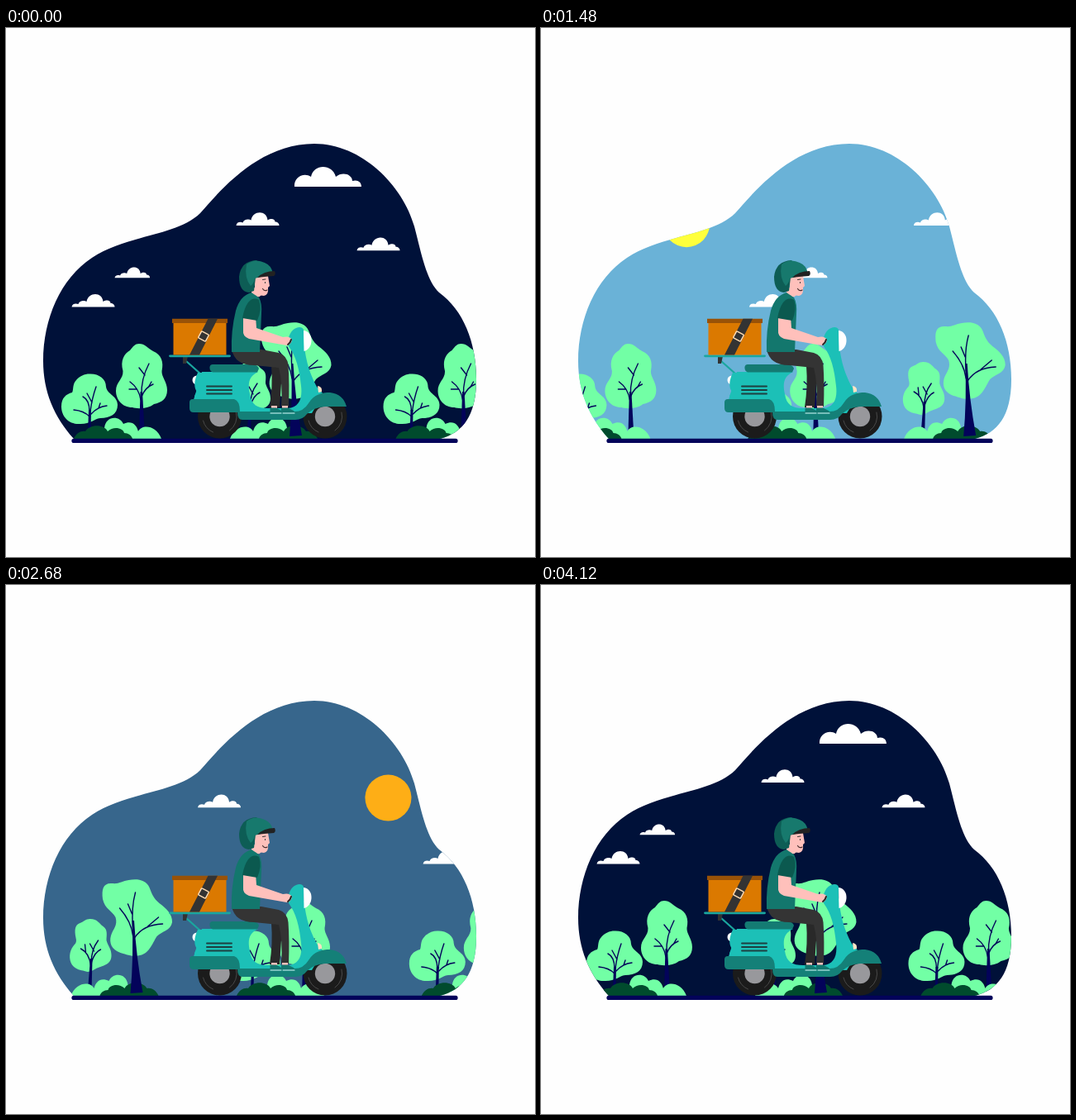
Animation of 640 by 640 pixels, one loop 4160 ms. Source, as an HTML page:

```html
<!DOCTYPE html>
<html lang="en">
<head>
<meta charset="utf-8">
<title>Scooter delivery</title>
<style>
html, body { margin: 0; width: 100%; height: 100%; overflow: hidden; background: #fefefe; }
svg { display: block; width: 100%; height: 100%; }
.leaf { fill: #72ffa5; }
.dark { fill: #004b2d; }
.trunk { fill: #03035a; }
.wood { fill: none; stroke: #03035a; stroke-width: 1.4; stroke-linecap: round; stroke-linejoin: round; }
.line { fill: none; stroke-linecap: round; stroke-linejoin: round; }
</style>
</head>
<body>
<svg viewBox="0 0 640 640">
  <defs>
    <clipPath id="blob"><path d="M82 497C58 470 45 440 45 403C45 352 66 303 104 278C146 250 206 252 235 224C262 193 308 140 373 140C430 140 480 190 494 240C502 270 508 305 524 320C553 341 569 380 569 425C569 470 552 490 525 497Z"/></clipPath>

    <path id="cloud" fill="#fff" d="M0 0C1-4.500 5-4.500 8-3.500C9-7.500 15-8.500 18-6.500C20-18.500 37-19 38-6.500C43-9.500 47-7.500 47-4.500C50-4.500 52-2.500 52 0Z"/>
    <path id="bigCloud" fill="#fff" d="M0 0C-1-11 11-18 20-12C23-28 46-28 50-12C58-19 70-15 70-7C76-9 81-6 81 0Z"/>

    <g id="bushes">
      <path class="leaf" d="M104 497C107 487 113 484 119 484C121 468 138 469 142 479C152 474 158 480 160 488C164 479 182 480 188 497Z"/>
      <path class="dark" d="M82 497C85 490 91 487 96 488C101 479 119 479 123 488C130 481 142 484 143 490C148 490 152 493 153 497Z"/>
    </g>

    <g id="pair">
      <path class="leaf" d="M101 418.500C112 418 121 424 121 434C122 443 135 445 135 456C135 467 126 472 114 472C106 473 103 479 90 479C76 480 67 470 67 458C67 447 73 443 80 441C82 438 80 431 85 426C89 421 95 418.500 101 418.500Z"/>
      <path class="leaf" d="M161 382C168 382 171 387 178 391C188 395 191 404 188.500 415C188 422 195 428 195 438C195 449 188 453 179 455C172 461 158 461 153 459C140 459 133 449 133 439C133 428 142 425 141.500 415C138 402 143 394 150 390C154 385 156 382 161 382Z"/>
      <path class="wood" d="M101 470Q94 463 82 462M101 464Q101 450 93 446M102 464Q104 448 109 434M104 453L98 442M103 467Q111 458 122 457M112 460L114 454"/>
      <path class="trunk" d="M100 462H103L102.500 492H99Z"/>
      <path class="wood" d="M163 450Q161 436 150 428M158 437L149 437M164 445Q163 425 173 406M168 420L161 411M164 446Q168 435 178 431M172 435L176 428"/>
      <path class="trunk" d="M162.500 440H165L168 494H161Z"/>
      <use href="#bushes"/>
    </g>

    <g id="grove">
      <path class="leaf" d="M294 404C304 404 305 410 310 413C316 417 314 424 314 430C316 437 320 440 320 448C320 459 311 460 304 463C298 465 297 468 291 468C286 466 282 467 276 463C270 459 268 450 271 442C274 434 279 435 277 427C275 417 276 411 282 409C287 407 289 404 294 404Z"/>
      <path class="wood" d="M295 460Q293 445 283 440M289 445L288 435M296 457Q295 442 304 430M299 443L294 434M296 456Q300 444 307 441"/>
      <path class="trunk" d="M294.500 452H297L296 490H291.500Z"/>
      <use href="#bushes" transform="translate(459 0) scale(-1 1)"/>
      <path class="leaf" d="M341 357C350 355 362 356 366 366C369 374 371 379 378 385C386 391 394 398 393.500 408C392 418 381 419 375 425C369 434 366 447 352 448.500C343 450 336 446 331 445C320 441 317 433 319.500 424C322 416 328 412 325 402C321 394 312 392 309.500 380C308 368 310 360 321 361C329 362 333 358 341 357Z"/>
      <path class="wood" d="M346 424Q344 407 330 391M346 415Q344 390 349 372M345 398L340 386M348 427Q358 411 382 410M364 413L377 402"/>
      <path class="trunk" d="M345 406H347.500Q350 450 358 493L343 494Q347 450 345 406Z"/>
    </g>

    <g id="wheel">
      <circle r="26.500" fill="#1b1b1b"/>
      <path class="line" stroke="#555" stroke-width=".8" d="M-20 5A20.500 20.500 0 0 0-8 19M20-5A20.500 20.500 0 0 1 12 17"/>
      <circle r="12.200" fill="#98989c"/>
    </g>
  </defs>

  <g clip-path="url(#blob)">
    <rect id="sky" width="640" height="640"/>
    <circle id="sun" r="28"/>
    <g id="clouds"></g>
    <g id="trees"></g>
  </g>
  <path class="line" stroke="#03035a" stroke-width="5.200" d="M82 499.400H544"/>

  <!-- Scooter -->
  <use href="#wheel" x="258.500" y="470"/>
  <use href="#wheel" x="386" y="470"/>
  <path class="line" stroke="#1aa79f" stroke-width="2.200" d="M218 403L236 419"/>
  <path fill="#333" d="M214 397H220L218 406H214Z"/>
  <circle cx="231" cy="426" r="5.500" fill="#fff"/>
  <path fill="#1cc0b7" d="M237 416H305C294 421 292 430 295 443C297 456 304 460 317 460H341C354 459 359 449 357 433C355 413 351 397 342 385C340 375 344 366 351 363C355 361 359 362 360 365C360 397 367 417 376 434L384 443L370 466H284L227 450Z"/>
  <path fill="#1cc0b7" d="M232 417H250V450H228Q227 445 231 440Q225 432 232 417Z"/>
  <path fill="#148078" d="M226 449H276Q283 451 283 464H349Q360 464 366 454C373 443 382 441 392 441Q408 443 412 458H386Q372 459 364 467Q359 474 350 474H286Q280 474 280 465H227Q222 465 222 460V453Q222 449 226 449Z"/>
  <path fill="#147b73" d="M250 407H299Q305 408 306 412L304 416.500H250Q246 415 246.500 410Q247 407 250 407Z"/>
  <path class="line" stroke="#1d3f40" stroke-width="1.900" d="M243 433.500H273M243 438H273M243 442.500H273"/>
  <path fill="#fff" d="M360 366C367 367 370 373 369.500 379C369 386 365 390 360.500 391Z"/>
  <path fill="#ffe3c4" d="M377 433Q383 434 382 440L378 441Z"/>

  <!-- Parcel -->
  <path class="line" stroke="#1aa79f" stroke-width="2.800" d="M198.500 396.800H270.500"/>
  <path fill="#db7900" d="M202.500 354H266.500V395.500H202.500Z"/>
  <path fill="#995207" d="M201 351.700H268V357H201Z"/>
  <path fill="#333" d="M244.500 351.700H256L234 395.500H222Z"/>
  <rect x="-5" y="-4.500" width="10" height="9" rx="1" transform="translate(239 373) rotate(28)" fill="#333" stroke="#ffdcb4" stroke-width="1.500"/>

  <!-- Rider -->
  <path fill="#292929" d="M306 397L335 401L331 459H319Q323 433 321 409Z"/>
  <path fill="#343434" d="M273 389H309L330 393Q340 396 341.500 408Q343 430 342 458H333Q335 430 330 411L300 408Q277 408 273 389Z"/>
  <path fill="#ffc0bb" d="M321 457H328V461H321ZM334 457H341V461H334Z"/>
  <path fill="#12776f" d="M319.500 459.500H327L335 464V466H319.500ZM333 459.500H341L348 463Q350 465 349 466H333Z"/>
  <path class="line" stroke="#d9ffff" stroke-width="1" d="M320 466H333M335 466H349"/>
  <path fill="#ffc0bb" d="M297 313L309 316V323Q305 328 297 323Z"/>
  <path fill="#13776d" d="M297 320Q303 324 306 326Q310 333 309 346L307 392H273Q272 366 278 342Q283 324 297 320Z"/>
  <path fill="#ffc0bb" d="M287 349H302L303 363L335 374Q343 372 346 377Q345 383 340 384L334 383L294 376Q286 373 287 366Z"/>
  <path fill="#0b594f" d="M293 332Q299 325 306 329Q310 340 304 354L286 351Q288 339 293 332Z"/>
  <path class="line" stroke="#252525" stroke-width="2" d="M345 377Q344 381 341 383"/>
  <path fill="#ffc0bb" d="M301 300H317L319 312L317 314Q318 323 312 324Q304 324 301 317Z"/>
  <path fill="#0d5d55" d="M303 281Q284 282 282 301Q282 319 294 320L300 318L302 302L315 297Z"/>
  <path fill="#17796d" d="M291 286Q301 278 313 284Q321 287 323 297L301 303Q300 309 296 312Q288 302 291 286Z"/>
  <path fill="#222" d="M304 302Q312 294 325 294Q327 298 324 300L312 301Z"/>
  <path class="line" stroke="#333" stroke-width="1" d="M310.500 304.500L314 304M313.500 307.500V308.500"/>
  <path class="line" stroke="#472c2c" stroke-width="1.200" d="M310.500 315.500Q313 319 316 317"/>
</svg>
<script>
const $ = id => document.getElementById(id);
const STEP = 40, LOOP = 104, CYCLE = 51, SPEED = 12.03;

const use = (name, x, y = 0, scale = 1) =>
  `<use href="#${name}" transform="translate(${x} ${y}) scale(${scale})"/>`;
const repeat = (part, width) => part + `<g transform="translate(${width} 0)">${part}</g>`;

$("clouds").innerHTML = repeat(
  use("cloud", 79.5, 337.6) + use("cloud", 131.5, 302.3, .82) + use("cloud", 278.5, 238.9) +
  use("bigCloud", 349, 192) + use("cloud", 424.5, 269.2), 617.5);
$("trees").innerHTML = repeat(use("pair", 0) + use("grove", 0) + use("pair", 389.5), 613.3);

// Colour stops: [step, r, g, b]
const skyStops = [[0, 0, 17, 57], [16, 98, 171, 208], [22, 122, 195, 232], [37, 106, 178, 215],
  [51, 80, 143, 179], [67, 55, 102, 140], [88, 20, 49, 88], [100, 0, 17, 57]];
const sunStops = [[16, 252, 253, 130], [37, 255, 255, 60], [51, 253, 251, 20],
  [67, 254, 174, 22], [88, 255, 127, 20]];

function colour(stops, step) {
  let i = stops.findIndex(s => s[0] >= step);
  if (i < 0) i = stops.length - 1;
  const b = stops[i], a = stops[Math.max(0, i - 1)];
  const k = a === b ? 1 : Math.min(1, (step - a[0]) / (b[0] - a[0]));
  return `rgb(${[1, 2, 3].map(c => Math.round(a[c] + (b[c] - a[c]) * k))})`;
}

function draw() {
  const step = Math.floor(performance.now() / STEP) % LOOP;
  const shift = step ? ((step - 1) % CYCLE + 1) * SPEED : 0;
  for (const id of ["clouds", "trees"]) $(id).setAttribute("transform", `translate(${-shift} 0)`);

  const angle = (-8 + 1.963 * step) * Math.PI / 180;
  $("sun").setAttribute("cx", 301.2 - 292 * Math.cos(angle));
  $("sun").setAttribute("cy", 501 - 292 * Math.sin(angle));
  $("sun").setAttribute("fill", colour(sunStops, step));
  $("sky").setAttribute("fill", colour(skyStops, step));
  requestAnimationFrame(draw);
}
draw();
</script>
</body>
</html>
```
